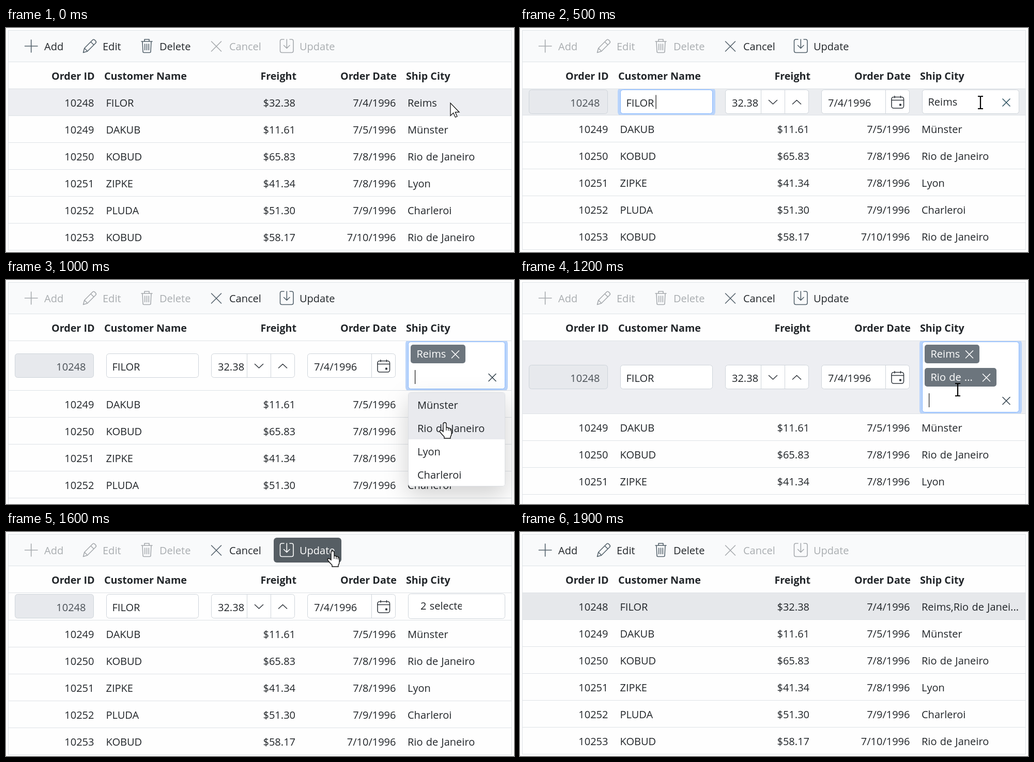
Write an HTML page that moves like this. It is 983 px wide and 433 px high and loops after 2200 ms.

```html
<!DOCTYPE html>
<html lang="en">
<head>
<meta charset="utf-8">
<title>Order grid editing</title>
<style>
html, body { margin: 0; width: 100%; height: 100%; overflow: hidden; background: #fefefe; }
svg { display: block; width: 983px; height: 433px; }
text { font: 20px "Open Sans", "Noto Sans", sans-serif; word-spacing: 1px; fill: #212529; white-space: pre; }
.head { font-size: 19.7px; font-weight: 700; word-spacing: 0; }
.end { text-anchor: end; }
.icon { fill: none; stroke-width: 1.6; stroke-linecap: round; stroke-linejoin: round; }
</style>
</head>
<body>
<svg id="stage" viewBox="0 0 983 433"></svg>
<script>
const LOOP = 2200;
const INK = '#212529', LINE = '#dee2e6', EDGE = '#ced4da';
const SELECTED = '#e6e8eb', HOVER = '#edeef2', PAGE = '#fefefe';

const orders = [
  ['10248', 'FILOR', '$32.38', '7/4/1996', 'Reims'],
  ['10249', 'DAKUB', '$11.61', '7/5/1996', 'Münster'],
  ['10250', 'KOBUD', '$65.83', '7/8/1996', 'Rio de Janeiro'],
  ['10251', 'ZIPKE', '$41.34', '7/8/1996', 'Lyon'],
  ['10252', 'PLUDA', '$51.30', '7/9/1996', 'Charleroi'],
  ['10253', 'KOBUD', '$58.17', '7/10/1996', 'Rio de Janeiro']
];
const cities = ['Münster', 'Rio de Janeiro', 'Lyon', 'Charleroi'];

// Layouts: end = lower edge of the first row, top = upper edge of its fields
const view = { end: 169 };
const saved = { end: 169, row: SELECTED, city: 'Reims,Rio de Janei...' };
const nameEdit = { end: 168, top: 119.5, row: '#ebedf0', focus: 'name', box: 165.5 };
const cityEdit = { end: 213, top: 142.5, row: HOVER, focus: 'city', box: 210.5, chips: 1 };
const twoCities = { end: 258, top: 164.5, row: HOVER, focus: 'city', box: 255.5, chips: 2 };
const summary = { end: 170, top: 120.5, row: PAGE, box: 167.5, press: true };

const step = (at, layout, cursor, extra) => ({ at, ...layout, cursor, ...extra });
const steps = [
  step(0, view, ['arrow', 860, 145], { row: HOVER }),
  step(100, view, ['arrow', 852, 152], { row: HOVER }),
  step(300, view, ['arrow', 852, 152], { row: SELECTED }),
  step(500, nameEdit, ['beam', 891, 144]),
  step(600, cityEdit, ['beam', 895, 143]),
  step(700, cityEdit, ['beam', 896, 142], { hot: 1 }),
  step(800, cityEdit, ['beam', 882, 180], { hot: 1 }),
  step(900, cityEdit, ['hand', 862, 240], { hot: 1, row: PAGE }),
  step(1000, cityEdit, ['hand', 849, 276], { hot: 2, row: PAGE }),
  step(1200, twoCities, ['beam', 847, 212]),
  step(1300, twoCities, ['arrow', 770, 95], { row: PAGE }),
  step(1400, twoCities, ['arrow', 652, 68], { row: PAGE }),
  step(1500, twoCities, ['hand', 632, 37], { row: PAGE, press: true }),
  step(1600, summary, ['hand', 632, 37]),
  step(1700, saved, ['arrow', 745, 42]),
  step(1800, saved, ['arrow', 965, 42]),
  step(1900, saved)
];

const text = (x, y, s, cls = '', fill = INK) =>
  `<text x="${x}" y="${y}" class="${cls}" style="fill:${fill}">${s}</text>`;
const rect = (x, y, w, h, fill, stroke = 'none', r = 0, more = '') =>
  `<rect x="${x}" y="${y}" width="${w}" height="${h}" rx="${r}" fill="${fill}" stroke="${stroke}" ${more}/>`;
const path = (d, stroke, more = '') => `<path class="icon" d="${d}" stroke="${stroke}" ${more}/>`;
const rule = y => rect(5, y, 973, 1, LINE);
const cross = (x, y, r, color) =>
  path(`M${x - r} ${y - r}l${2 * r} ${2 * r}M${x + r} ${y - r}l${-2 * r} ${2 * r}`, color);
const caret = (x, y) => rect(x, y, 1.2, 27, '#111');

function toolbar(s) {
  const editing = s.top !== undefined;
  const tools = [
    ['Add', 74, 'M36.5 35H61M48.7 23V47', false],
    ['Edit', 187, 'M149.5 47.5l2.3-8.5L167.5 23.2q2-2 4.3 .2l1.6 1.6q2 2.2 0 4.2L157.6 45ZM151.8 39l5.8 6M164 26.8l6 6', false],
    ['Delete', 297, 'M262 26H283M268 26V22H277V26M264 26L265 45.5Q265 47.5 267 47.5H278Q280 47.5 280 45.5L281 26M268.7 31V42.5M272.5 31V42.5M276.3 31V42.5', false],
    ['Cancel', 432, 'M397.5 26L416.5 45M416.5 26L397.5 45', true],
    ['Update', 568, 'M538 22H534Q530.5 22 530.5 25.5V44Q530.5 47.5 534 47.5H552.5Q556 47.5 556 44V25.5Q556 22 552.5 22H549M543.3 22V39M537.5 33.5L543.3 39.2L549 33.5', true]
  ];
  return (s.press ? rect(518, 11, 131, 48, '#565e64', 'none', 6) : '') +
    tools.map(([label, x, icon, inEdit]) => {
      const on = inEdit === editing;
      const lit = s.press && label === 'Update';
      return path(icon, lit ? '#fff' : on ? '#53616b' : '#a6aaae') +
        text(x, 43, label, '', lit ? '#fff' : on ? INK : '#a9adb0');
    }).join('');
}

function row([id, name, freight, date, city], y) {
  return text(170.5, y, id, 'end') + text(193.5, y, name) + text(560, y, freight, 'end') +
    text(754.5, y, date, 'end') + text(777, y, city);
}

function field(x, y, w, h, focused, fill = '#fff') {
  const glow = focused ? rect(x - 2.5, y - 2.5, w + 5, h + 5, 'none', '#b9d4fb', 6, 'stroke-width="6"') : '';
  return glow + rect(x, y, w, h, fill, focused ? '#86b7fe' : EDGE, 5);
}

function chip(label, y, w) {
  return rect(783, y, w, 36, '#6c757d', 'none', 5) + text(794.5, y + 25, label, '', '#fff') +
    cross(783 + w - 19.5, y + 18.8, 7, '#fff');
}

function cityField(s) {
  let out = field(778.5, 119.5, 187, s.box - 119.5, s.focus === 'city');
  if (s.chips) {
    const y = 130 + 45 * s.chips;
    out += chip('Reims', 125, 106) + caret(791, y - 1) + cross(941, y + 13.5, 7, '#34434d');
    if (s.chips > 1) out += chip('Rio de ...', 170, 139);
  } else if (s.focus) {
    out += text(789.5, 150, 'Reims') + cross(941, 144, 7, '#2f5361');
  } else {
    out += `<g clip-path="url(#short)">${text(802, 150, '2 selected')}</g>`;
  }
  return out;
}

function editor(s) {
  const t = s.top, base = t + 32.5, mid = t + 24;
  const fields = field(17.5, t, 152, 46, false, '#e7e9ed') + text(154.5, base, orders[0][0], 'end', '#4a5056') +
    field(194.5, t, 178, 46, s.focus === 'name') + text(205.5, base, orders[0][1]) +
    (s.focus === 'name' ? caret(262.5, t + 10) : '') +
    field(397.5, t, 161, 46) + text(410, base, '32.38') +
    field(583.5, t, 170, 46) + text(596, base, orders[0][3]) +
    path(`M466.5 ${t}v46M512.5 ${t}v46M707.5 ${t}v46`, EDGE, 'style="stroke-width:1"');
  const icons = path(`M481.5 ${mid - 4}l8 7.5l8-7.5M527.5 ${mid + 3.5}l8-7.5l8 7.5`, '#343a40') +
    rect(719, mid - 10, 23.5, 21.5, 'none', '#343a40', 4, 'stroke-width="1.6"') +
    path(`M719 ${mid - 4}h23.5M725 ${mid - 12}v3.5M736.5 ${mid - 12}v3.5`, '#343a40') +
    rect(734, mid + 3, 4, 4, '#343a40', 'none', 1);
  return `<g clip-path="url(#edit)">${fields}${icons}${cityField(s)}</g>`;
}

function popup(hot) {
  const items = cities.map((c, i) =>
    (i < hot ? rect(779, 218 + 45 * i, 186, 45, '#e9eaee') : '') + text(796, 249 + 45 * i, c)).join('');
  return rect(778.5, 217.5, 187, 181, '#fff', '#dcdfe3', 4, 'filter="url(#shade)"') + items;
}

function cursor([kind, x, y]) {
  const shapes = {
    arrow: '<path d="M0 0V24.5L5.7 19L9.5 27.5L13 26L9.3 17.7H17Z" fill="#fff" stroke="#111" stroke-width="1.3"/>',
    beam: '<path d="M-5 -12H-2Q0 -12 0 -10Q0 -12 2 -12H5M0 -10V10M-5 12H-2Q0 12 0 10Q0 12 2 12H5" fill="none" stroke="#000" stroke-width="2.2"/>',
    hand: '<path d="M-3 17V2.5Q-3 -.5 0 -.5T3 2.5V10Q3 8.8 5 9T7 11Q7.3 10 9 10.3T10.5 12.5Q11 11.5 12 12T13 14.5V21Q13 25 11 27V30H-1V27Q-6 22 -9 18Q-10.5 15.5 -8.5 14.5Q-6.5 13.5 -3 17Z" fill="#fff" stroke="#111" stroke-width="1.4"/>' +
      '<path d="M3 10V15M7 11V15.5M10.5 12.5V16" stroke="#111" stroke-width="1.2"/>'
  };
  return `<g transform="translate(${x} ${y})">${shapes[kind]}</g>`;
}

function draw(s) {
  const defs = `<defs>
    <clipPath id="edit"><rect x="5" y="118" width="973" height="${s.end - 118}"/></clipPath>
    <clipPath id="short"><rect x="790" y="125" width="92" height="36"/></clipPath>
    <filter id="shade" x="-60%" y="-60%" width="220%" height="220%">
      <feDropShadow dx="0" dy="16" stdDeviation="22" flood-color="#000" flood-opacity=".175"/>
    </filter></defs>`;
  const heads = text(171.5, 100, 'Order ID', 'head end') + text(190, 100, 'Customer Name', 'head') +
    text(562, 100, 'Freight', 'head end') + text(756, 100, 'Order Date', 'head end') +
    text(774, 100, 'Ship City', 'head');
  const first = [...orders[0].slice(0, 4), s.city || orders[0][4]];
  const rest = orders.slice(1).map((o, i) =>
    rule(s.end + 52 * i) + row(o, s.end + 35 + 52 * i)).join('');
  stage.innerHTML = defs + rect(0, 0, 983, 433, PAGE) +
    rect(5, 5, 973, 60, '#f9fafb') + rect(5, 118, 973, s.end - 118, s.row) +
    rect(4.5, 4.5, 974, s.end + 256, 'none', LINE) + rule(65) + rule(117) +
    toolbar(s) + heads + rest + (s.top ? editor(s) : row(first, 152)) +
    (s.hot ? popup(s.hot) : '') + (s.cursor ? cursor(s.cursor) : '');
}

const stage = document.getElementById('stage');
const start = performance.now();
let shown;
function tick() {
  const t = (performance.now() - start) % LOOP;
  const now = steps.findLast(s => s.at <= t) || steps[0];
  if (now !== shown) draw(shown = now);
  requestAnimationFrame(tick);
}
tick();
</script>
</body>
</html>
```
